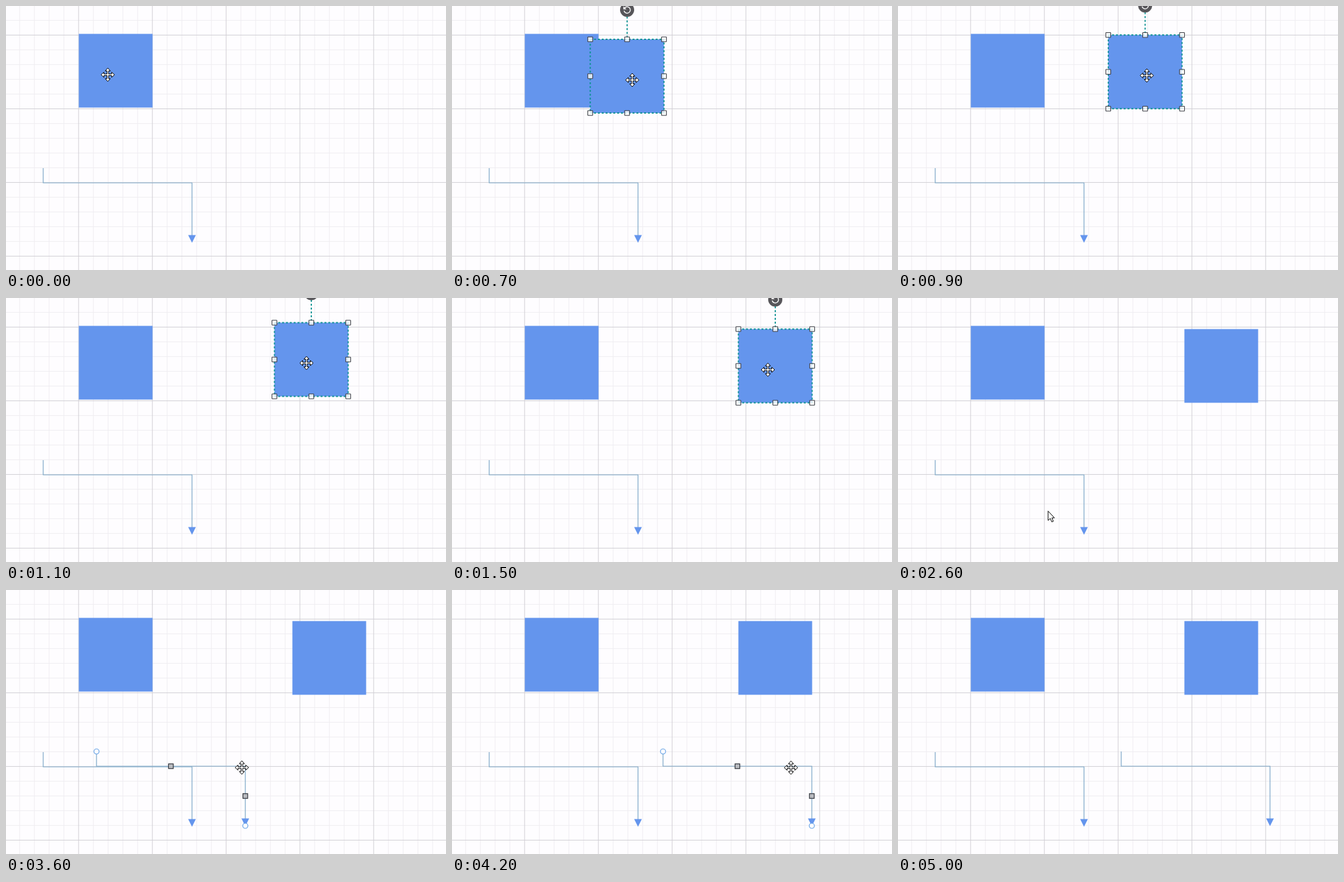
An HTML page for the animation above (5.1 s loop, 686 by 412 pixels).

```html
<!DOCTYPE html>
<html lang="en">
<head>
<meta charset="utf-8">
<title>Duplicating diagram shapes</title>
<style>
  html, body { margin: 0; width: 100%; height: 100%; overflow: hidden; background: #fefdff; }
  svg { display: block; }
  .minor { stroke: #efedf1; }
  .major { stroke: #d1cfd4; }
  .box { fill: #6495ed; }
  .link { fill: none; stroke: #7ca7c8; stroke-width: 1.2; }
  .picked .link { stroke: #67a3e6; }
  .tip { fill: #6495ed; }
  .frame { fill: none; stroke: #0c9292; stroke-width: 1.8; stroke-dasharray: 3 3; }
  .grip { fill: rgba(255, 255, 255, .8); stroke: #3a3d44; stroke-width: 1.1; }
  .thumb { fill: #b9bbc0; stroke: #30343a; stroke-width: 1.2; }
  .end { fill: #fefdff; stroke: #67a3e6; stroke-width: 1.2; }
  .cursor { fill: #fff; stroke: #000; stroke-width: 1; }
</style>
</head>
<body>
<svg width="686" height="412" viewBox="0 0 686 412">
  <defs>
    <rect id="box" class="box" x="113.5" y="43.5" width="115" height="115"/>
    <path id="line" d="M58 253V276H290V358"/>
    <path id="head" d="M0 -10.5L4 -6H1.2V-1.2H6V-4L10.5 0L6 4V1.2H1.2V6H4L0 10.5L-4 6H-1.2V1.2H-6V4L-10.5 0L-6 -4V-1.2H-1.2V-6H-4Z"/>
    <g id="connector">
      <use href="#line" class="link"/>
      <path class="tip" d="M284 357.5h12l-6 12z"/>
    </g>
  </defs>
  <g id="grid"></g>
  <use href="#box"/>
  <use href="#connector"/>

  <g id="boxCopy">
    <use href="#box"/>
    <g id="boxTools">
      <path class="frame" d="M171 8V43.5"/>
      <rect class="frame" x="113.5" y="43.5" width="115" height="115"/>
      <circle cx="171" cy="-2.5" r="11" fill="#57565a"/>
      <path d="M166.6 -4.6a5 5 0 1 1 -.4 3.6" fill="none" stroke="#fff" stroke-width="1.4"/>
      <path d="M165.2 -8v4.8h4.8z" fill="#fff"/>
      <g id="grips"></g>
    </g>
  </g>

  <g id="linkCopy">
    <use href="#connector"/>
    <g id="linkTools">
      <circle class="end" cx="58" cy="253" r="4"/>
      <circle class="end" cx="290" cy="369" r="4"/>
      <rect class="thumb" x="170.3" y="272.3" width="7.4" height="7.4"/>
      <rect class="thumb" x="286.3" y="318.8" width="7.4" height="7.4"/>
    </g>
  </g>

  <g id="cursor" class="cursor">
    <use id="move" href="#head"/>
    <path id="arrow" d="M.5 .5V15.2L3.9 12L6.3 17.4L8.7 16.4L6.4 11.1H10.4Z"/>
  </g>
</svg>
<script>
  const LOOP = 5100, STEP = 100;
  const $ = id => document.getElementById(id);

  function add(parent, tag, attrs) {
    const el = document.createElementNS('http://www.w3.org/2000/svg', tag);
    for (const k in attrs) el.setAttribute(k, attrs[k]);
    parent.appendChild(el);
  }

  // Every fifth grid line is a major one.
  function gridLines(kind) {
    let d = '';
    for (let i = -5; i < 30; i++) {
      if ((i % 5 === 0) !== (kind === 'major')) continue;
      d += `M${113.2 + 23 * i} 0V412M0 ${45.4 + 23 * i}H686`;
    }
    add($('grid'), 'path', { class: kind, d });
  }
  gridLines('minor');
  gridLines('major');

  for (let i = 0; i < 9; i++) {
    if (i === 4) continue;
    const x = 109.7 + 57.5 * (i % 3), y = 39.7 + 57.5 * Math.floor(i / 3);
    add($('grips'), 'rect', { class: 'grip', x, y, width: 7.6, height: 7.6, rx: .6 });
  }

  // Where the pointer or a dragged copy turns or rests: [time, x, y].
  const boxDrag = [[300, 0, 0], [700, 102, 8.5], [1100, 305, -5], [1500, 333, 5]];
  const linkDrag = [[3200, 0, -1], [3800, 145, -1], [4200, 271, -1], [4400, 290, -1]];
  const pointer = [
    [0, 158.7, 107.3], [300, 158.7, 107.3], [700, 281, 115.5], [1100, 468.5, 101.5],
    [1500, 492.5, 112], [2000, 600.5, 195], [2600, 233.5, 332], [3100, 242, 277],
    [4200, 528.5, 277.3], [4500, 532, 277.3], [4900, 290, 14]
  ];

  // Smooth curve through the keys that never overshoots them.
  function glide(keys, t, axis) {
    const last = keys.length - 1;
    const i = Math.max(0, keys.findLastIndex(k => k[0] <= t));
    if (t <= keys[0][0] || i === last) return keys[i][axis];
    const slope = n => (keys[n + 1][axis] - keys[n][axis]) / (keys[n + 1][0] - keys[n][0]);
    const tangent = n => {
      if (n === 0 || n === last) return 0;
      const a = slope(n - 1), b = slope(n);
      return a * b > 0 ? 2 * a * b / (a + b) : 0;
    };
    const span = keys[i + 1][0] - keys[i][0];
    const u = (t - keys[i][0]) / span, v = 1 - u;
    return keys[i][axis] * v * v * (1 + 2 * u) + keys[i + 1][axis] * u * u * (3 - 2 * u)
      + span * u * v * (tangent(i) * v - tangent(i + 1) * u);
  }

  const show = (id, on) => { $(id).style.display = on ? '' : 'none'; };
  const place = (id, keys, t) =>
    $(id).setAttribute('transform', `translate(${glide(keys, t, 1)} ${glide(keys, t, 2)})`);

  function draw(now) {
    const t = Math.floor(now % LOOP / STEP) * STEP;
    const moving = t < 1800 || (t >= 3100 && t < 4600);
    const linkPicked = t >= 3300 && t < 4800;

    show('boxCopy', t >= 400);
    show('boxTools', t < 2100);
    place('boxCopy', boxDrag, t);

    show('linkCopy', t >= 3300);
    show('linkTools', linkPicked);
    $('linkCopy').classList.toggle('picked', linkPicked);
    place('linkCopy', linkDrag, t);

    show('cursor', t < 5000);
    show('move', moving);
    show('arrow', !moving);
    place('cursor', pointer, t);
  }

  const start = performance.now();
  function tick() {
    draw(performance.now() - start);
    requestAnimationFrame(tick);
  }
  tick();
</script>
</body>
</html>
```
